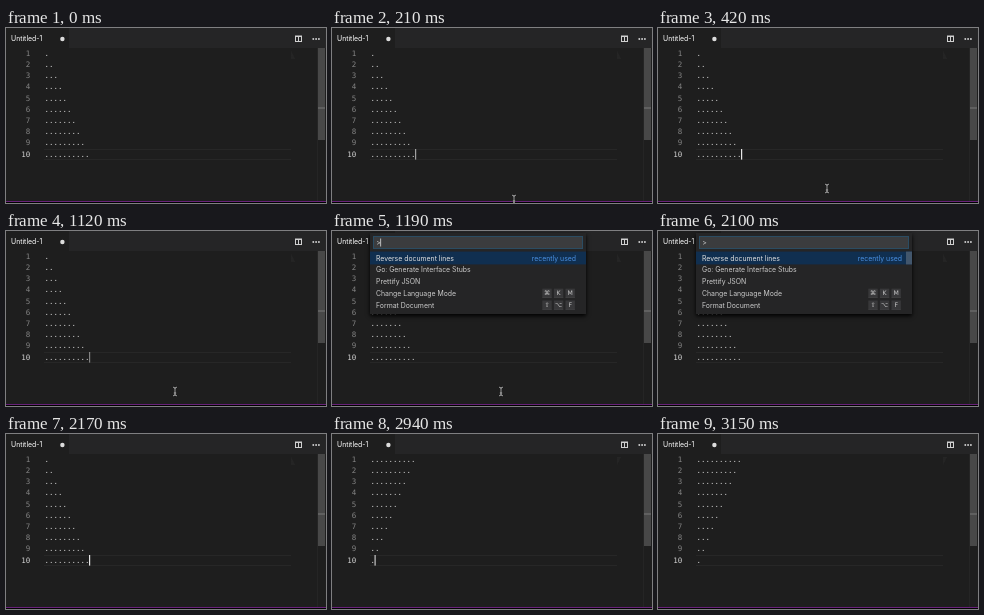
An HTML page with a canvas for the animation above (3.29 s loop, 320 by 175 pixels).

```html
<!DOCTYPE html>
<html lang="en">
<head>
<meta charset="utf-8">
<title>Reverse lines</title>
<style>
html, body { margin: 0; width: 100%; height: 100%; overflow: hidden; background: #1e1e1e; }
canvas { display: block; width: 320px; height: 175px; }
</style>
</head>
<body>
<canvas id="stage"></canvas>
<script>
const W = 320, H = 175, LOOP = 3290, TICK = 70;
const UI = 'Inter, Roboto, sans-serif';
const MONO = '"DejaVu Sans Mono", "Liberation Mono", monospace';
const SYMBOL = '"DejaVu Sans", Inter, sans-serif';
const LINES = 10, PITCH = 11.2, CHAR = 4.5, LEFT = 38.5;

const canvas = document.getElementById('stage');
const ctx = canvas.getContext('2d');
const ratio = window.devicePixelRatio || 1;
canvas.width = W * ratio;
canvas.height = H * ratio;
ctx.scale(ratio, ratio);

const clamp = v => Math.max(0, Math.min(1, v));
const ease = v => v * v * (3 - 2 * v);
const ramp = (t, a, b) => ease(clamp((t - a) / (b - a)));

function box(x, y, w, h, color) {
  ctx.fillStyle = color;
  ctx.fillRect(x, y, w, h);
}

function text(s, x, y, color, size = 6.9, font = UI, align = 'left') {
  ctx.font = size + 'px ' + font;
  ctx.textAlign = align;
  ctx.fillStyle = color;
  ctx.fillText(s, x, y);
}

function disc(x, y, r, color) {
  ctx.fillStyle = color;
  ctx.beginPath();
  ctx.arc(x, y, r, 0, Math.PI * 2);
  ctx.fill();
}

function drawTabs() {
  box(0, 0, W, 20, '#252526');
  box(0, 0, 63, 20, '#1e1e1e');
  text('Untitled-1', 5, 13.4, '#ffffff');
  disc(56.4, 11, 2.2, '#dcdcdc');
  ctx.strokeStyle = '#d0d0d0';
  ctx.lineWidth = 1;
  ctx.strokeRect(289.5, 8.5, 6, 5);
  box(289, 7.5, 7, 1.5, '#d0d0d0');
  box(292, 8, 1, 6, '#d0d0d0');
  for (let i = 0; i < 3; i++) disc(307.3 + i * 2.8, 11, 0.95, '#d0d0d0');
}

function drawEditor(reversed) {
  box(38, 121, 247, 0.7, '#2c2c2c');
  box(38, 131.2, 247, 0.7, '#2c2c2c');
  for (let i = 0; i < LINES; i++) {
    const y = 27.8 + i * PITCH;
    const count = reversed ? LINES - i : i + 1;
    text(i + 1, 24.3, y, i === LINES - 1 ? '#d0d0d0' : '#858585', 7.48, MONO, 'right');
    text('.'.repeat(count), LEFT, y, '#d8d8d8', 7.48, MONO);
    box(285, 23 + i * 0.8, count * 0.4, 0.5, '#2a2a2a');
  }
  box(311.5, 20, 0.6, 153, '#2c2c2c');
  box(312, 20, 7, 92, '#484848');
  box(312, 79.5, 7, 1, '#787878');
  box(0, 173, W, 1, '#68217a');
  box(0, 174, W, 1, '#000000');
}

function drawCaret(column, alpha) {
  ctx.globalAlpha = alpha;
  box(LEFT + column * CHAR - 0.5, 121, 1.2, 10.6, '#e6e6e6');
  ctx.globalAlpha = 1;
}

function drawKeys(keys, y) {
  keys.forEach((key, i) => {
    const x = 210.3 + i * 11.6;
    box(x, y - 4.5, 9.4, 9, '#38383a');
    box(x, y + 4, 9.4, 0.6, '#474748');
    text(key, x + 4.7, y + 2.2, '#cccccc', 6.2, SYMBOL, 'center');
  });
}

function drawPalette(caretOn, scrollbarOn) {
  ctx.save();
  ctx.shadowColor = '#000';
  ctx.shadowBlur = 4 * ratio;
  ctx.shadowOffsetY = 1.5 * ratio;
  box(38, 2, 216, 81, '#252526');
  ctx.restore();
  box(41.5, 5.5, 209, 12, '#3b3c3e');
  ctx.strokeStyle = '#2b4c62';
  ctx.lineWidth = 1;
  ctx.strokeRect(41.5, 5.5, 209, 12);
  text('>', 44.2, 13.9, '#cccccc');
  if (caretOn) box(48.3, 7.5, 0.8, 8, '#dddddd');
  box(38, 20.6, 216, 12.8, '#102f50');
  if (scrollbarOn) box(248, 20.6, 6, 12.8, '#42566c');
  const items = ['Reverse document lines', 'Go: Generate Interface Stubs',
    'Prettify JSON', 'Change Language Mode', 'Format Document'];
  items.forEach((item, i) =>
    text(item, 44, 29.5 + i * 11.75, i ? '#cccccc' : '#e0e0e0'));
  text('recently used', 244, 29.5, '#4a90e2', 6.9, UI, 'right');
  drawKeys(['⌘', 'K', 'M'], 62.2);
  drawKeys(['⇧', '⌥', 'F'], 74);
}

function drawPointer(x, y) {
  ctx.lineCap = 'round';
  for (const [color, width] of [['#161616', 1.6], ['#d0d0d0', 0.75]]) {
    ctx.strokeStyle = color;
    ctx.lineWidth = width;
    ctx.beginPath();
    for (const s of [-1, 1]) {
      ctx.moveTo(x - 1.6, y + s * 4.3);
      ctx.quadraticCurveTo(x, y + s * 4.3, x, y + s * 3);
      ctx.quadraticCurveTo(x, y + s * 4.3, x + 1.6, y + s * 4.3);
    }
    ctx.moveTo(x, y - 3);
    ctx.lineTo(x, y + 3);
    ctx.moveTo(x - 0.8, y + 1.5);
    ctx.lineTo(x + 0.8, y + 1.5);
    ctx.stroke();
  }
}

function draw(t) {
  const reversed = t >= 2240;
  const palette = t >= 1190 && t < 2170;
  box(0, 0, W, H, '#1e1e1e');
  drawTabs();
  drawEditor(reversed);

  if (palette) drawPalette(t < 1680, t >= 1260);
  else if (t < 1190) drawCaret(LINES, ramp(t, 0, 350) * (1 - ramp(t, 980, 1260)));
  else drawCaret(reversed ? 1 : LINES, 1 - ramp(t, 2870, 3150));

  if (t >= 70 && t < 2100) {
    const p = ramp(t, 0, 420);
    drawPointer(169 + 26 * (1 - p), 160.5 + 22 * (1 - p));
  }
}

const start = performance.now();
function loop() {
  const t = (performance.now() - start) % LOOP;
  draw(Math.floor(t / TICK) * TICK);
  requestAnimationFrame(loop);
}
loop();
</script>
</body>
</html>
```
